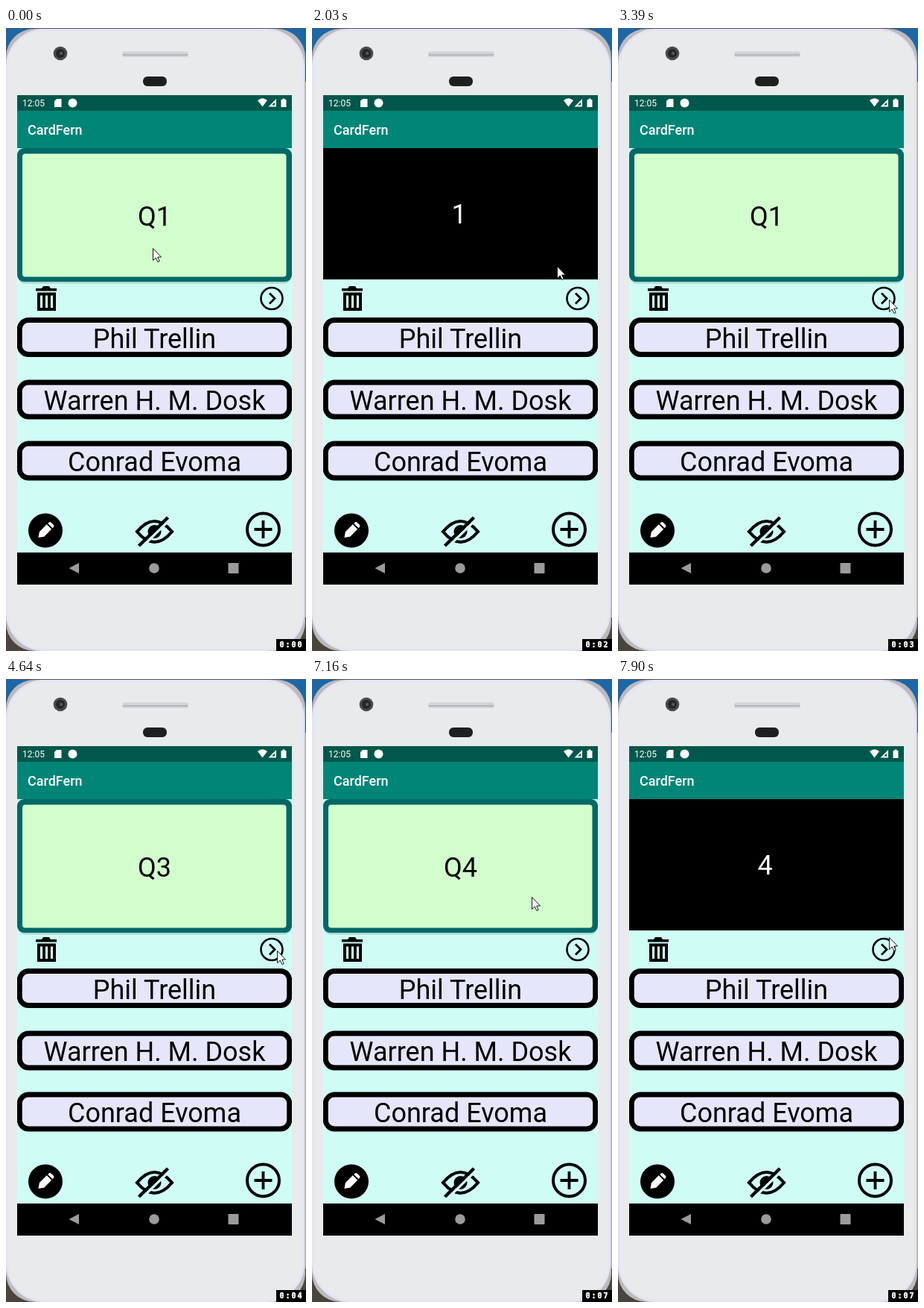
Recreate the animation shown at these times as an HTML page. Size 403 px wide and 835 px high, loop 8 s.

```html
<!DOCTYPE html>
<html lang="en">
<head>
<meta charset="utf-8">
<style>
  html, body { margin: 0; width: 100%; height: 100%; overflow: hidden; }
  svg { display: block; width: 403px; height: 835px; }
  text { font-family: Roboto, sans-serif; }
  .big { font-size: 36px; text-anchor: middle; }
  .line { fill: none; stroke: #000; }
  .answer rect { fill: #e6e6fa; stroke: #000; stroke-width: 7; }
</style>
</head>
<body>
<svg viewBox="0 0 403 835">
  <defs>
    <linearGradient id="desktop" x2="0" y2="1">
      <stop offset="0" stop-color="#1c67a8"/>
      <stop offset=".5" stop-color="#39556b"/>
      <stop offset="1" stop-color="#4b443c"/>
    </linearGradient>
    <clipPath id="screen"><rect x="15" y="90" width="369" height="656"/></clipPath>
  </defs>

  <!-- phone body -->
  <rect width="403" height="835" fill="url(#desktop)"/>
  <rect width="403" height="1" fill="#55585c"/>
  <path d="M401.5 72V790" stroke="#b4b5ba" stroke-width="3"/>
  <rect y="1" width="402" height="834" rx="38" fill="#bdbabd"/>
  <rect x="1.5" y="2.5" width="398" height="831" rx="50" fill="#e9eaec" stroke="#e6e4f3" stroke-width="3"/>
  <circle cx="73" cy="34" r="9.3" fill="#4a4a4c"/>
  <circle cx="73" cy="34" r="6" fill="#262628"/>
  <circle cx="74" cy="34" r="2.2" fill="#55555a"/>
  <rect x="156" y="31.5" width="89" height="7.5" rx="3" fill="#d3d4d9"/>
  <path d="M157 36H244" stroke="#b4b6bd" stroke-width="2"/>
  <rect x="184" y="65" width="32" height="13" rx="6" fill="#1f1f20"/>

  <g clip-path="url(#screen)">
    <rect x="15" y="90" width="369" height="656" fill="#cffdf6"/>
    <rect x="15" y="90" width="369" height="21" fill="#00574b"/>
    <rect x="15" y="111" width="369" height="50" fill="#008577"/>
    <g fill="#fff">
      <text x="22" y="105" font-size="12">12:05</text>
      <path d="M68 95H74.5V106H65V98Z"/>
      <circle cx="89.5" cy="100.5" r="6"/>
      <path d="M338 97Q344.5 91.5 351 97L344.5 105.5Z"/>
      <path d="M363 95V105.5H352.5Z"/>
      <path d="M371.5 94.5H374.5V96H376.5V106H369.5V96H371.5Z"/>
      <text x="29" y="143" font-size="18" font-weight="500">CardFern</text>
    </g>
    <path d="M357 103.5L361 99.5V103.5Z" fill="#00574b"/>

    <!-- question and answer sides -->
    <g id="front">
      <rect x="16" y="164" width="367" height="178.5" rx="9" fill="#8fbdb8" opacity=".6"/>
      <rect x="15" y="161" width="369" height="179" rx="9" fill="#006866"/>
      <rect x="22" y="168.5" width="354.5" height="165" rx="4" fill="#d2fdcc"/>
      <text id="question" class="big" x="199.5" y="265"></text>
    </g>
    <g id="back">
      <rect x="15" y="161" width="369" height="176"/>
      <text id="reply" class="big" x="197.5" y="262" fill="#fff"></text>
    </g>

    <!-- trash and next -->
    <path d="M40 349H48L50 346H58L60 349H68V352.5H40Z"/>
    <path d="M42 354.5H67V379H42Z"/>
    <path d="M47.5 358.5V375M54.5 358.5V375M61.5 358.5V375" stroke="#cffdf6" stroke-width="3.2"/>
    <circle class="line" cx="357" cy="362.5" r="14.5" stroke-width="2.6"/>
    <path class="line" d="M354 355.5L361 362.5L354 369.5" stroke-width="2.8"/>

    <g class="answer" id="answers"></g>

    <!-- edit, hide and add -->
    <circle cx="53" cy="673.5" r="23"/>
    <path transform="translate(53 673.5) rotate(45)" fill="#fff" d="M-4.5 -10.5Q-4.5 -13 -2.5 -13H2.5Q4.5 -13 4.5 -10.5V-9H-4.5ZM-4.5 -7H4.5V7L0 13.5L-4.5 7Z"/>
    <path class="line" d="M176 675Q199.5 647 223 675Q199.5 703 176 675Z" stroke-width="4.2"/>
    <circle cx="199.5" cy="675" r="9"/>
    <path d="M181.5 696.5L220.5 658.5" stroke="#cffdf6" stroke-width="3.5"/>
    <path class="line" d="M178.5 694L217.5 656" stroke-width="4.5"/>
    <circle class="line" cx="345.5" cy="672" r="21.5" stroke-width="4"/>
    <path class="line" d="M333.5 672H357.5M345.5 660V684" stroke-width="3.8"/>

    <!-- navigation bar -->
    <rect x="15" y="703" width="369" height="43"/>
    <g fill="#9b9b9b">
      <path d="M98 717V731L84.5 724Z"/>
      <circle cx="199" cy="724" r="6.8"/>
      <rect x="298.5" y="717" width="14" height="14" rx="1"/>
    </g>
  </g>

  <path id="cursor" d="M.5 .5V16.5L4.2 13L6.9 18.5L9.2 17.5L6.7 12H11.5Z" fill="#fff" stroke="#000" stroke-width=".9"/>

  <rect x="363" y="819" width="40" height="16"/>
  <text id="clock" x="367.5" y="830" fill="#fff" stroke="#fff" stroke-width=".5" font-size="10" font-weight="700" letter-spacing="1.98" style="font-family: 'DejaVu Sans Mono', monospace"></text>
</svg>
<script>
const DURATION = 8000;
const el = id => document.getElementById(id);

// Each entry is [start time, values...] and holds until the next one.
const cursorSteps = [
  [0, 197, 295], [150, 254, 289], [400, 293, 308], [540, 310, 316], [910, 322, 316],
  [1570, 329, 317], [1720, 329, 319], [2870, 343, 329], [3020, 354, 345], [3240, 362, 358],
  [3390, 364, 364], [6550, 349, 352], [6700, 337, 336], [6850, 320, 315], [7010, 304, 299],
  [7160, 295, 292], [7310, 296, 294], [7750, 367, 344], [7900, 364, 346]
];
const cardSteps = [[0, 1], [3650, 2], [4640, 3], [5470, 4]];
const flipSteps = [[0, false], [1870, true], [2590, false], [7310, true]];
const clockSteps = [0, 1010, 2030, 3090, 4080, 5040, 6120, 7080].map((t, i) => [t, i]);

const at = (steps, t) => steps.findLast(step => step[0] <= t).slice(1);

el('answers').innerHTML = [
  ['Phil Trellin', 388], ['Warren H. M. Dosk', 471.5], ['Conrad Evoma', 553.5]
].map(([name, y]) => `
  <rect x="18.25" y="${y + 3.5}" width="362.5" height="46" rx="12"/>
  <text class="big" x="199.5" y="${y + 40.5}">${name}</text>`).join('');

function draw(now) {
  const t = now % DURATION;
  const [x, y] = at(cursorSteps, t);
  const [card] = at(cardSteps, t);
  const [flipped] = at(flipSteps, t);
  el('cursor').setAttribute('transform', `translate(${x} ${y})`);
  el('question').textContent = 'Q' + card;
  el('reply').textContent = card;
  el('front').style.display = flipped ? 'none' : '';
  el('back').style.display = flipped ? '' : 'none';
  el('clock').textContent = '0:0' + at(clockSteps, t)[0];
}

const start = performance.now();
function tick() {
  draw(performance.now() - start);
  requestAnimationFrame(tick);
}
tick();
</script>
</body>
</html>
```
